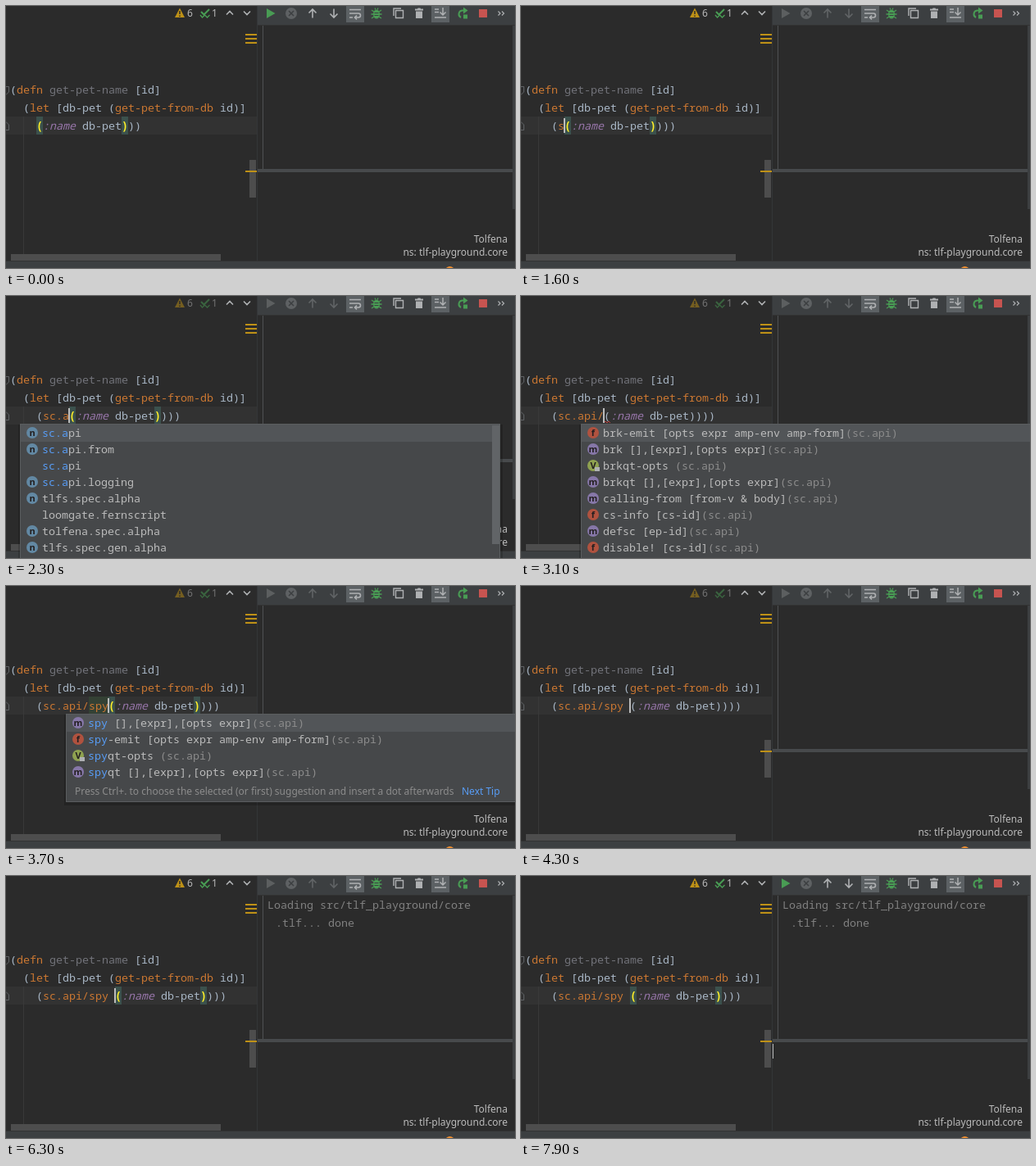
An HTML page that plays this animation: 621x320 px, repeating every 8 s.

```html
<!DOCTYPE html>
<html lang="en">
<head>
<meta charset="utf-8">
<title>Editor with REPL</title>
<style>
  html, body { margin: 0; width: 100%; height: 100%; overflow: hidden; background: #2b2b2b; }
  svg { display: block; width: 621px; height: 320px; }
  text { white-space: pre; font: 12px "Noto Sans", "Open Sans", sans-serif; fill: #bbb; }
  .mono { font: 13.3333px "Noto Sans Mono", "DejaVu Sans Mono", monospace; }
  .b { font-weight: 700; }
  .i { font-style: italic; }
  .line { fill: none; stroke: #afb1b3; stroke-width: 1.6; }
  .green { fill: none; stroke: #499c54; stroke-width: 2; }
  .off { stroke: #616466; }
  .mark { fill: #be9117; }
  .letter { font-size: 11px; font-weight: 600; fill: #231f20; text-anchor: middle; }
</style>
</head>
<body>
<svg viewBox="0 0 621 320">
  <rect width="621" height="320" fill="#2b2b2b"/>

  <!-- editor -->
  <rect y="135" width="306" height="22" fill="#323232"/>
  <path d="M21.5 135V303" stroke="#393939"/>
  <path d="M0 98.5H3.5V105L0 108.5M0 151.5H3.5V145L0 141.5" fill="none" stroke="#606366"/>
  <rect x="6" y="303" width="256" height="8" fill="#4d4d4d"/>
  <rect x="297" y="188" width="8" height="46" fill="#4d4d4d"/>
  <path class="mark" d="M292 34h14v2h-14zM292 39h14v2h-14zM292 44h14v2h-14zM292 201h14v2h-14z"/>
  <g id="widget">
    <path class="mark" d="M212 2.5L218 14H206Z"/>
    <path d="M212 6v4M212 11.5v1.5" stroke="#2b2b2b" stroke-width="1.5"/>
    <text x="221" y="13">6</text>
    <path class="green" d="M238 7l3.5 3.5L248 4"/>
    <path class="green" style="stroke-width:1.4" d="M237 11l2.5 3 3-3 3 3 3-3"/>
    <text x="251" y="13">1</text>
  </g>
  <path class="line" d="M269 10.5l4-4 4 4M290 6.5l4 4 4-4"/>
  <g id="code"></g>

  <!-- console -->
  <path d="M306.5 0V312" stroke="#343638"/>
  <rect x="307" width="314" height="23" fill="#3c3f41"/>
  <rect x="307" y="23" width="314" height="1" fill="#323232"/>
  <rect x="618" y="24" width="3" height="224" fill="#3c3f41"/>
  <path d="M313.5 24V199" stroke="#4f5153"/>
  <rect x="307" y="199" width="311" height="4" fill="#474a4c"/>
  <path id="play" d="M318 3L328.5 9 318 15Z"/>
  <circle id="stop" cx="348" cy="9" r="7"/>
  <path d="M345 6l6 6M351 6l-6 6" stroke="#3c3f41" stroke-width="1.5"/>
  <g id="arrows">
    <path class="line" d="M374 14.5V4M369.5 8.5L374 4l4.5 4.5"/>
    <path class="line" d="M400 3.5V14M395.5 9.5L400 14l4.5-4.5"/>
  </g>
  <path d="M415 0h22v20h-22zM519 0h22v20h-22z" fill="#5c6164"/>
  <path class="line" d="M419 4.5h14M419 9h11a2.5 2.5 0 0 1 0 5h-4M428 11.5l-2.5 2.5 2.5 2.5M419 14h4"/>
  <ellipse cx="452" cy="10" rx="4" ry="5.5" fill="#499c54"/>
  <path class="green" style="stroke-width:1.3" d="M446 5l3 2M458 5l-3 2M445.5 10h13M446 15l3-2M458 15l-3-2M450 2.5l1 2M454 2.5l-1 2"/>
  <path d="M449.5 8.5h5M449.5 11.5h5" stroke="#3c3f41"/>
  <path class="line" style="stroke-width:1.4" d="M475.5 5.5h9v9h-9zM473 12V3h9"/>
  <path d="M499 3.5h3l.5-1h3l.5 1h3v2h-10zM500 6.5h8v8.5h-8z" fill="#afb1b3"/>
  <path class="line" style="stroke-width:1.5" d="M523 4h5M523 7.5h5M523 14h14M533 2v8.5M529.5 7.5l3.5 3.5 3.5-3.5"/>
  <path class="green" d="M555 14a4.5 4.5 0 0 1 1.5-8.500h4"/>
  <path d="M558 1.500l5.500 4-5.500 4zM558 10.500h5v5h-5z" fill="#499c54"/>
  <rect x="577" y="4" width="10" height="10" fill="#c75450"/>
  <path class="line" style="stroke-width:1.2" d="M600.5 6.5l2.5 2.5-2.5 2.5M605 6.5l2.5 2.5-2.5 2.5"/>
  <g id="output"></g>
  <rect id="replCaret" x="307" y="205" width="1" height="18" fill="#bbb"/>
  <text x="612" y="289" text-anchor="end">Tolfena</text>
  <text x="612" y="305" text-anchor="end">ns: tlf-playground.core</text>

  <!-- status bar -->
  <rect y="312" width="621" height="8" fill="#3c3f41"/>
  <rect y="311" width="621" height="1" fill="#323232"/>
  <circle cx="541.5" cy="324" r="6" fill="#f09030"/>

  <g id="popup"></g>
</svg>
<script>
const LOOP = 8000, CHAR = 8;
const PLAIN = '#a9b7c6', ORANGE = '#cc7832', PURPLE = '#9876aa', YELLOW = '#ffef28',
      UNUSED = '#72737a', BLUE = '#589df6', DIM = '#8c8c8c', LIGHT = '#bbb', LOG = '#808080';
const $ = id => document.getElementById(id);

// What has been typed in front of the keyword call; null before the wrap.
const typing = [[0, null], [1100, ''], [1600, 's'], [1800, 'sc'], [2200, 'sc.'], [2300, 'sc.a'],
  [2400, 'sc.ap'], [2500, 'sc.api'], [3100, 'sc.api/'], [3400, 'sc.api/s'], [3600, 'sc.api/sp'],
  [3700, 'sc.api/spy'], [4300, 'sc.api/spy ']];

const spaces = [['n', 'sc.api'], ['n', 'sc.api.from'], ['', 'sc.api'], ['n', 'sc.api.logging'],
  ['n', 'tlfs.spec.alpha'], ['', 'loomgate.fernscript'], ['n', 'tolfena.spec.alpha'],
  ['n', 'tlfs.spec.gen.alpha']];
const members = [['f', 'brk-emit [opts expr amp-env amp-form]'], ['m', 'brk [],[expr],[opts expr]'],
  ['V', 'brkqt-opts '], ['m', 'brkqt [],[expr],[opts expr]'], ['m', 'calling-from [from-v & body]'],
  ['f', 'cs-info [cs-id]'], ['m', 'defsc [ep-id]'], ['f', 'disable! [cs-id]']];
const spies = [['m', 'spy [],[expr],[opts expr]'], ['f', 'spy-emit [opts expr amp-env amp-form]'],
  ['V', 'spyqt-opts '], ['m', 'spyqt [],[expr],[opts expr]']];
const iconFill = { n: '#6288a3', f: '#b0523f', m: '#8677a8', V: '#8fa250' };

const within = (t, ...spans) => spans.some(([a, b]) => t >= a && t < b);
const valueAt = (list, t) => list.filter(([start]) => start <= t).pop()[1];
const esc = s => s.replace(/&/g, '&amp;').replace(/</g, '&lt;');
const rect = (x, y, w, h, fill) =>
  `<rect x="${x}" y="${y}" width="${w}" height="${h}" fill="${fill}"/>`;
const mono = (x, y, ...parts) => `<text class="mono" x="${x}" y="${y}">` + parts.map(
  ([fill, s, cls = '']) => `<tspan class="${cls}" style="fill:${fill}">${esc(s)}</tspan>`).join('') + '</text>';

const head =
  mono(5, 107, [PLAIN, '('], [ORANGE, 'defn'], [UNUSED, ' get-pet-name'], [PLAIN, ' [id]']) +
  mono(21, 129, [PLAIN, '('], [ORANGE, 'let'], [PLAIN, ' [db-pet ('],
    [ORANGE, 'get-pet-from-db'], [PLAIN, ' id)]']);

function drawCode(s) {
  const wrapped = s.typed !== null;
  const start = 37, open = start + (wrapped ? CHAR * (s.typed.length + 1) : 0);
  const close = open + 13 * CHAR;
  const bracket = s.matched ? [YELLOW, 'b'] : [PLAIN, ''];
  let out = head;
  if (s.typed === 'sc.api/spy') out += rect(open - 24, 135, 24, 22, '#344134');
  if (s.matched) out += [open, close].map(x => rect(x, 135, CHAR, 22, '#3b514d')).join('');
  out += mono(start, 151,
    [PLAIN, wrapped ? '(' : ''], [ORANGE, s.typed || ''],
    [bracket[0], '(', bracket[1]], [PURPLE, ':name', 'i'], [PLAIN, ' db-pet'],
    [bracket[0], ')', bracket[1]], [PLAIN, wrapped ? ')))' : '))']);
  if (s.error) out += `<path d="M${open} 155l2-2 2 2 2-2 2 2" fill="none" stroke="#bc3f3c"/>`;
  if (s.caret) out += rect(open - 1, 137, 2, 18, '#bbb');
  return out;
}

function drawIcon(kind, x, y) {
  if (!kind) return '';
  const lock = kind === 'V' ? rect(x + 2, y + 2, 6, 5, '#afb1b3') : '';
  return `<circle cx="${x}" cy="${y}" r="7" fill="${iconFill[kind]}"/>` +
    `<text class="letter" x="${x}" y="${y + 3.5}">${kind}</text>` + lock;
}

function drawPopup(s) {
  if (!s.popup) return '';
  const inner = s.typed.includes('/');
  const prefix = inner ? s.typed.slice(7) : s.typed;
  const x = inner ? 73 : 17, w = inner ? 560 : 586;
  const rows = !inner ? (s.typed === 'sc.api' ? spaces.slice(0, 4) : spaces)
    : !prefix ? members
    : prefix === 's' ? [...spies, ...members.slice(5)] : spies;
  const short = rows.length < 8;
  const h = short ? rows.length * 20 + 28 : 200;
  let out = rect(x - 2, 157, w + 5, h + 3, 'rgba(0,0,0,.18)') + rect(x, 156, w, h, '#5a5d5f') +
    rect(x + 1, 157, w - 2, h - 2, '#46484a') + rect(x + 1, 157, w - 2, 21, '#525558');
  rows.forEach(([kind, label], i) => {
    const n = label.startsWith(prefix) ? prefix.length : 0;
    out += drawIcon(kind, x + 15, 167 + i * 20) + mono(x + 27, 172 + i * 20,
      [BLUE, label.slice(0, n)], [LIGHT, label.slice(n)], [DIM, inner ? '(sc.api)' : '']);
  });
  if (short) {
    const y = 175 + rows.length * 20;
    out += `<text x="${x + 11}" y="${y}" style="fill:${DIM}">Press Ctrl+. to choose the selected ` +
      `(or first) suggestion and insert a dot afterwards</text>` +
      `<text x="${x + 483}" y="${y}" style="fill:${BLUE}">Next Tip</text>`;
  } else if (!inner) out += rect(593, 158, 9, 145, '#616467');
  return out;
}

const stateAt = t => ({
  typed: valueAt(typing, t),
  matched: !within(t, [3100, 3200], [4300, 4400]),
  error: within(t, [3100, 3200]),
  caret: within(t, [300, 800], [1100, 5900], [6300, 6900]),
  popup: within(t, [2300, 4300]),
  dim: within(t, [1400, 1600], [1900, 5300]),
  play: !within(t, [900, 7800]),
  arrows: !within(t, [900, 7900]),
  busy: within(t, [5300, 5900]),
  loaded: t >= 5500,
  repl: t >= 7400
});

function draw(s) {
  $('code').innerHTML = drawCode(s);
  $('popup').innerHTML = drawPopup(s);
  $('output').innerHTML = s.loaded
    ? mono(319, 40, [LOG, 'Loading src/tlf_playground/core']) +
      mono(321, 62, [LOG, ' .tlf... done']) : '';
  $('widget').setAttribute('opacity', s.dim ? .5 : 1);
  $('play').setAttribute('fill', s.play ? '#499c54' : '#5c5f60');
  $('stop').setAttribute('fill', s.busy ? '#c75450' : '#5e6163');
  for (const arrow of $('arrows').children) arrow.classList.toggle('off', !s.arrows);
  $('replCaret').setAttribute('opacity', s.repl ? 1 : 0);
}

let shown = '';
function tick() {
  const s = stateAt(performance.now() % LOOP), key = JSON.stringify(s);
  if (key !== shown) draw(s);
  shown = key;
  requestAnimationFrame(tick);
}
tick();
</script>
</body>
</html>
```
